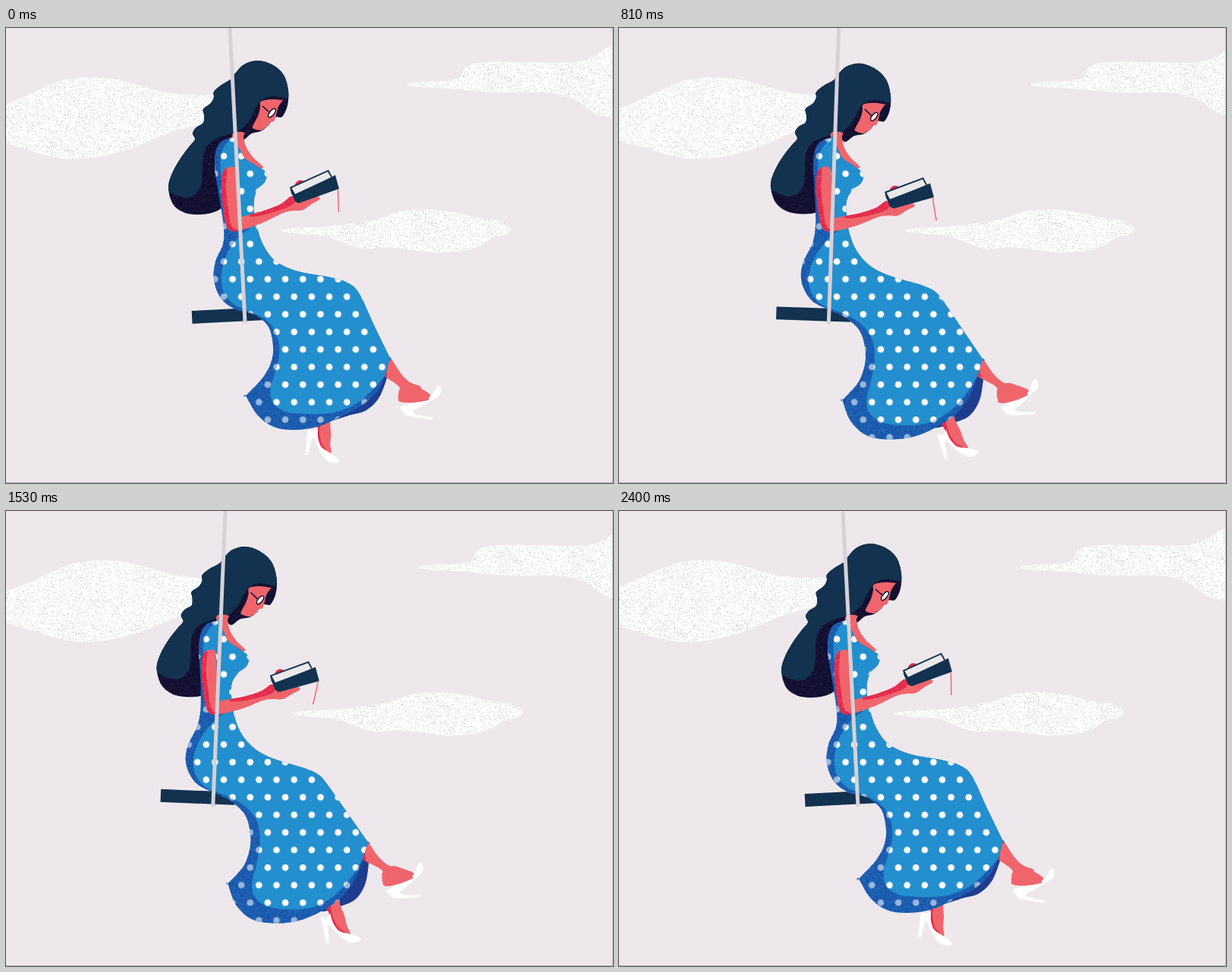
An HTML page for the animation above (2430 ms loop, 800 by 600 pixels).

```html
<!DOCTYPE html>
<html lang="en">
<head>
<meta charset="utf-8">
<title>Reading on a swing</title>
<style>
html, body { margin: 0; width: 100%; height: 100%; overflow: hidden; background: #eee8ec; }
svg { display: block; width: 100vw; height: 100vh; }
</style>
</head>
<body>
<svg id="stage" viewBox="0 0 800 600">
  <defs id="defs">
    <pattern id="dots" x="281.2" y="163.2" width="23.18" height="46.34" patternUnits="userSpaceOnUse">
      <g fill="#fff">
        <circle cx="5.8" cy="5.8" r="4.3"/>
        <circle cx="17.39" cy="28.97" r="4.3"/>
      </g>
    </pattern>
  </defs>
  <rect width="800" height="600" fill="#eee8ec"/>
  <g id="clouds"></g>
  <g id="swing1"><rect x="222.3" y="370" width="98" height="17" fill="#123250"/></g>
  <g id="hair"></g>
  <g id="body"></g>
  <g id="face"></g>
  <g id="arm"></g>
  <path id="ribbon" fill="none" stroke="#ef6a74" stroke-width="1.5"/>
  <g id="swing2"><path d="M291.75 -70V390" stroke="#d6d1d7" stroke-width="5"/></g>
  <path d="M799.5 0V599.5H0" fill="none" stroke="#bdb8bd"/>
</svg>
<script>
const NS = 'http://www.w3.org/2000/svg';
const $ = id => document.getElementById(id);
const LOOP = 2430, STEP = 30;

const SKIN = '#f0656b', RED = '#e2294a', NAVY = '#123250', INK = '#110f30',
  BLUE = '#238fce', SHADE = '#1d62b5', DEEP = '#1f3d8f', WHITE = '#fff';

function add(parent, tag, attrs) {
  const el = document.createElementNS(NS, tag);
  for (const key in attrs) el.setAttribute(key, attrs[key]);
  return parent.appendChild(el);
}

const nums = text => text.trim().split(/[\s,]+/).map(Number);

// Closed smooth curve; a doubled point makes a corner.
function curve(v) {
  const n = v.length / 2;
  const at = i => { const j = ((i + n) % n) * 2; return [v[j], v[j + 1]]; };
  const f = x => x.toFixed(2);
  let d = `M${f(v[0])} ${f(v[1])}`;
  for (let i = 0; i < n; i++) {
    const a = at(i - 1), b = at(i), c = at(i + 1), e = at(i + 2);
    d += 'C' + [b[0] + (c[0] - a[0]) / 6, b[1] + (c[1] - a[1]) / 6,
      c[0] - (e[0] - b[0]) / 6, c[1] - (e[1] - b[1]) / 6, c[0], c[1]].map(f).join(' ');
  }
  return d + 'Z';
}

let seed = 7;
const rnd = () => (seed = (seed * 16807) % 2147483647) / 2147483647;

function grain(id, color, count) {
  const size = 96;
  const p = add($('defs'), 'pattern', { id, width: size, height: size, patternUnits: 'userSpaceOnUse' });
  let d = '';
  for (let i = 0; i < count; i++) d += `M${Math.floor(rnd() * size)} ${Math.floor(rnd() * size)}h1v1h-1z`;
  add(p, 'path', { d, fill: color });
}
grain('gCloud', '#d9d5d8', 1300);
grain('gBlue', '#174a9c', 2200);
grain('gInk', '#2a1d4c', 1200);
grain('gRed', '#f0506a', 1200);

const still = (parent, pts, fill) => add($(parent), 'path', { d: curve(nums(pts)), fill });
function textured(parent, pts, fill, tex) {
  still(parent, pts, fill);
  still(parent, pts, `url(#${tex})`);
}
const poly = (parent, points, fill) => add($(parent), 'polygon', { points, fill });

// Shapes that change between the two ends of the swing.
const morphs = [];
function morph(a, b, ...fills) {
  const paths = fills.map(fill => add($('body'), 'path', { fill }));
  morphs.push({ a: nums(a), b: nums(b), paths });
  return paths;
}

// Clouds
textured('clouds', `-40,116 0,101 40,83 75,69 110,65 150,69 190,80 215,86 245,88 275,89 290,95 285,118
  250,128 215,138 180,153 140,166 90,173 50,167 15,156 -20,145`, WHITE, 'gCloud');
textured('clouds', `529,74 545,71 575,70 597,66 603,55 612,48 640,45 680,45 730,46 760,43 782,32 800,22
  830,14 830,120 800,118 775,112 755,98 735,89 710,85 640,85 590,80 545,78`, WHITE, 'gCloud');
textured('clouds', `361,267 380,264 420,262 455,258 490,252 520,242 555,239 590,243 620,250 650,254
  665,263 662,271 640,277 625,287 600,294 565,296 530,292 500,289 470,291 445,283 420,274 385,271`, WHITE, 'gCloud');

// Hair
const crown = '332,43 352,49 366,62 372,82 ';
const waves = ` 214,211 218,194 228,175 241,157 249,147 246,139 251,131 260,125 261,115 260,107
  270,99 274,91 274,84 284,75 297,67 302,60 314,48`;
textured('hair', crown + `371,102 364,117 354,118 345,129 336,136 324,139 314,147 309,146 304,141 290,150
  279,165 275,185 279,205 285,225 284,237 270,244 251,246 234,243 220,232` + waves, INK, 'gInk');
still('hair', crown + `371,93 371,93 352,90 337,95 328,108 320,123 306,136 285,143 268,152 260,168
  259,190 257,208 247,221 232,223 216,217 216,217` + waves, NAVY);

// Face
still('face', `336,97 350,94 365,95 365,95 359,104 356,115 353,123 348,124 347,128 341,132 336,135
  327,133 325,130 332,116 335,105`, SKIN);
add($('face'), 'path', { d: 'M338 103L347 111', stroke: INK, 'stroke-width': 1.6 });
add($('face'), 'ellipse', { cx: 350.5, cy: 112, rx: 2.9, ry: 6.8, fill: WHITE, stroke: INK,
  'stroke-width': 1.4, transform: 'rotate(38 350.5 112)' });

// Neck and underside of the skirt
morph('300,138 314,138 313,144 317,158 326,171 339,184 320,182 300,150',
  '276,138 291,138 290,144 293,158 301,171 313,184 295,182 278,150', SKIN);
morph('425,517 455,510 475,504 492,487 503,459 503,459 485,458 440,490',
  '412,528 440,522 460,512 472,491 476,461 476,461 455,460 415,500', DEEP);

// Rear leg and shoe
const rear = add($('body'), 'g', { id: 'rear' });
still('rear', '409,505 429,505 427,520 428,535 427,548 428,560 420,560 413,548 411,532', SKIN);
textured('rear', '409,508 416,508 414,522 413,535 416,548 423,558 416,556 411,545 410,530', RED, 'gRed');
still('rear', `398,528 404,531 411,527 411,527 411,540 415,552 425,559 434,565 439,571 433,573 424,571
  415,561 407,544 403,542 398,563 398,563 394,562 394,562 396,545`, WHITE);

// Front leg and shoe
morph('495,425 508,437 520,455 532,467 547,474 540,488 522,488 521,480 516,471 498,458 490,445',
  '462,425 475,438 487,455 499,466 514,474 510,486 497,488 496,480 491,472 467,459 458,445', SKIN);
morph('495,430 507,436 503,442 501,450 502,459 496,457 490,445',
  '462,430 474,437 471,443 470,451 472,460 465,458 458,445', RED, 'url(#gRed)');
const foot = add($('body'), 'g', { id: 'foot' });
still('foot', '520,474 534,469 546,475 559,484 557,491 536,494 520,493 517,488', SKIN);
still('foot', `557,488 562,483 569,473 573,474 572,484 560,492 546,500 536,506 546,511 562,514 562,514
  561,517 561,517 536,513 525,509 519,499 519,499 535,495 556,491`, WHITE);

// Dress
const frontA = `300,144 307,158 315,172 329,181 343,191 341,203 332,212 327,226 327,245 331,264 340,288
  356,308 385,321 428,329 452,337 466,351 485,392 506,435 506,435 500,458 500,458 `;
const frontB = `278,144 284,158 291,172 304,181 317,192 315,204 304,213 295,226 294,245 297,268 307,294
  326,315 351,328 392,341 408,349 418,360 443,394 474,437 474,437 467,459 467,459 `;
const spots = morph(frontA + `490,478 470,497 440,513 410,526 380,530 353,526 332,511 316,485 316,485 340,459
  351,435 351,411 344,391 325,377 302,371 283,356 274,332 276,308 286,285 287,264 283,235 278,205
  275,180 277,160 285,149 300,144`,
  frontB + `457,486 438,512 410,531 382,542 352,545 322,540 300,520 290,492 290,492 311,468
  319,442 318,420 311,400 293,383 270,371 247,359 234,336 235,312 248,285 253,264 254,235 253,205
  252,180 255,160 263,149 278,144`, SHADE, 'url(#gBlue)', 'url(#dots)');
spots[2].setAttribute('opacity', 0.55);
morph(frontA + `484,476 462,495 432,507 395,509 366,505 351,492 349,474 354,456 360,432 358,408 345,387
  322,374 300,364 287,348 284,325 291,298 308,274 322,264 322,264 300,262 290,230 284,200 283,170 290,153 300,144`,
  frontB + `452,484 430,508 402,524 366,527 340,522 324,508 322,490 327,470 332,440 329,412 315,392
  290,377 262,366 247,350 243,328 252,302 272,276 289,265 289,265 270,262 262,230 258,200 259,170 268,153 278,144`,
  BLUE, 'url(#dots)');

// Arm and book
still('arm', '381,208 384,202 390,201 394,205 390,211', RED);
still('arm', `290,185 300,183 303,190 304,215 306,250 306,250 340,241 365,232 376,222 390,222 410,222 413,226
  403,232 391,240 378,241 365,244 340,256 312,266 298,268 291,262 287,245 284,215 285,194`, SKIN);
textured('arm', '291,185 285,194 284,215 287,245 291,262 298,268 306,267 297,261 293,240 290,212', RED, 'gRed');
textured('arm', '322,246 340,241 362,232 376,222 380,229 372,236 345,245 324,249', RED, 'gRed');
poly('arm', '374,210 425,187 430,196 381,222 376,218', NAVY);
poly('arm', '376.5,211 424,189.5 428.5,197 381,219', '#ebe8ea');
poly('arm', '376,217 381,220.5 434,194 439,212 386,231 381,229', NAVY);

// Eased travel from 0 to 1, steep in the middle.
function ease(x) {
  const h = 0.53;
  let lo = 0, hi = 1;
  for (let i = 0; i < 24; i++) {
    const u = (lo + hi) / 2, w = 1 - u;
    if (3 * h * u * w * w + 3 * (1 - h) * u * u * w + u * u * u < x) lo = u; else hi = u;
  }
  return lo * lo * (3 - 2 * lo);
}

function swing(t) {
  const s = ((t + 6) % LOOP) / (LOOP / 2);
  return ease(s < 1 ? s : 2 - s);
}

const set = (id, value) => $(id).setAttribute('transform', value);

function draw(t) {
  const k = swing(t) / 0.98, q = swing(t + 120);

  set('clouds', `translate(${16.7 * k} 0)`);
  const turn = `rotate(${5.9 * k - 2.95} 291.75 -63)`;
  set('swing1', turn);
  set('swing2', turn);

  const head = `matrix(1 ${0.07 * k} 0 1 ${-17 * k} ${-18.7 * k})`;
  set('hair', head);
  set('face', head);
  set('arm', `matrix(1 ${0.095 * k} 0 1 ${-28.8 * k} ${-28.2 * k})`);

  set('rear', `translate(${18 * q} ${14 * q * (1 - q) - q}) rotate(${-26.5 * q ** 1.4} 420 520)`);
  const tilt = 1 - (1 - q) ** 4;
  set('foot', `translate(${-25 * k ** 1.4} ${2 * tilt}) rotate(${-13 * tilt} 520 482)`);

  for (const m of morphs) {
    const d = curve(m.a.map((v, i) => v + (m.b[i] - v) * k));
    m.paths.forEach(p => p.setAttribute('d', d));
  }

  const x = 437.5 - 29 * k, y = 212 + 13 * k;
  const sway = 7.3 * Math.sin(2 * Math.PI * t / LOOP + 0.2) - 0.5;
  $('ribbon').setAttribute('d', `M${x} ${y}Q${x + sway * 0.3} ${y + 14} ${x + sway} ${y + 31}`);
}

const start = performance.now();
function tick() {
  const t = (performance.now() - start) % LOOP;
  draw(Math.floor(t / STEP) * STEP);
  requestAnimationFrame(tick);
}
tick();
</script>
</body>
</html>
```
